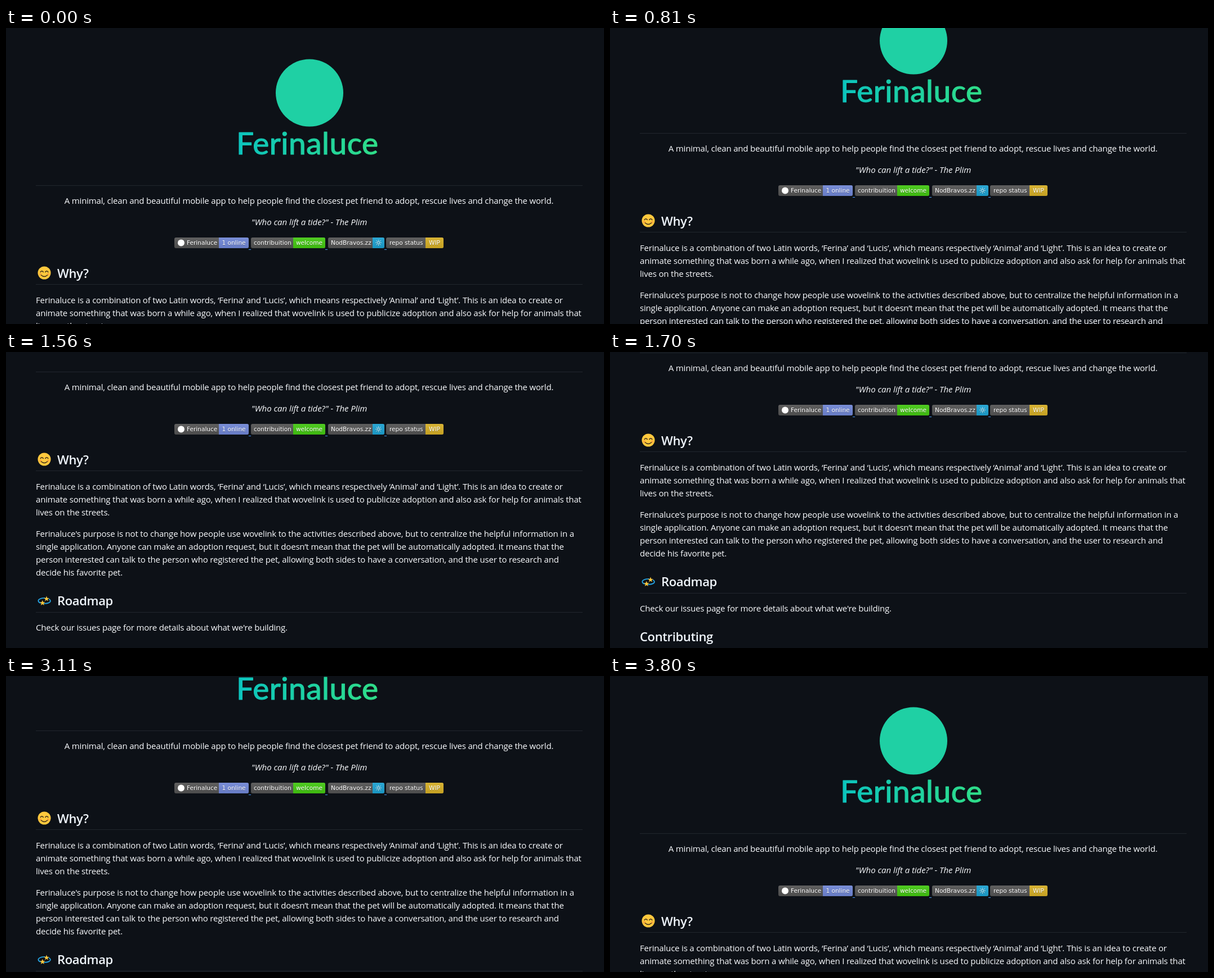
These frames come from a looping animation (1062 by 527 pixels, 4730 ms). An HTML page:

```html
<!DOCTYPE html>
<html lang="en">
<head>
<meta charset="utf-8">
<title>Readme scroll</title>
<style>
  html, body { margin: 0; width: 100%; height: 100%; overflow: hidden; background: #0d1117; }
  svg { display: block; width: 1062px; height: 527px; }
  text { font: 15px "Open Sans", "Noto Sans", sans-serif; letter-spacing: -.187px; fill: #fafcff; }
  .mid { text-anchor: middle; }
  .quote { font-style: italic; letter-spacing: -.05px; }
  .head { font-size: 22px; font-weight: 600; letter-spacing: -.36px; fill: #f0f6fc; }
  .word { font: 55px Lato, sans-serif; letter-spacing: .5px; fill: url(#brand); stroke: url(#brand); stroke-width: 1.2; stroke-linejoin: round; }
  .badge text { font: 10.56px "DejaVu Sans", sans-serif; letter-spacing: 0; fill: #fff; }
  .badge .shade { fill: #010101; fill-opacity: .3; }
  .rule { fill: #21262d; }
  .link { fill: #4493f8; }
  .line { fill: none; stroke-linecap: round; }
</style>
</head>
<body>
<svg viewBox="0 0 1062 527">
  <defs>
    <linearGradient id="brand" gradientUnits="userSpaceOnUse" x1="413" x2="660" y1="0" y2="0">
      <stop stop-color="#0cc4bd"/><stop offset="1" stop-color="#2fde88"/>
    </linearGradient>
    <linearGradient id="gloss" x2="0" y2="1">
      <stop stop-color="#bbb" stop-opacity=".1"/><stop offset="1" stop-opacity=".1"/>
    </linearGradient>
    <path id="star" d="M0-5 1.3-1.6 4.8-1.5 2 .7 3 4.1 0 2.1-3 4.1-2 .7-4.8-1.5-1.3-1.6Z"/>
  </defs>
  <g id="page">
    <circle cx="539" cy="115.5" r="60" fill="#1fd0a4"/>
    <text class="word" x="409" y="225">Ferinaluce</text>

    <text class="mid" x="538" y="313">A minimal, clean and beautiful mobile app to help people find the closest pet friend to adopt, rescue lives and change the world.</text>
    <text class="mid quote" x="538.5" y="351">"Who can lift a tide?" - The Plim</text>
    <g id="badges"></g>

    <!-- smiling face -->
    <g transform="translate(68 436)">
      <circle r="11.5" fill="#ffc83d"/>
      <circle cx="-7" cy="2.5" r="2.2" fill="#ff9a3c" opacity=".7"/>
      <circle cx="7" cy="2.5" r="2.2" fill="#ff9a3c" opacity=".7"/>
      <path class="line" stroke="#3b2d1a" stroke-width="1.5" d="M-6.8-1.5Q-4.3-5-1.8-1.5M1.8-1.5Q4.3-5 6.8-1.5M-5.5 4Q0 9 5.5 4"/>
    </g>
    <text class="head" x="91" y="445">Why?</text>
    <g id="body"></g>

    <!-- orbiting stars -->
    <g transform="translate(68 688)">
      <path class="line" stroke="#26a5e4" stroke-width="1.8" d="M1-4.8C-6-5.2-11-2.5-10.6.3C-10.3 2.2-8.6 3.2-6.8 3.8M0 4.9C7 5 11.3 2.5 10.8-.2C10.5-1.6 9.8-2.4 8.6-3"/>
      <use href="#star" x="4" y="-3.5" fill="#ffc83d"/>
      <use href="#star" x="-3.2" y="3.8" fill="#ffc83d"/>
    </g>
    <text class="head" x="91" y="696">Roadmap</text>
    <text x="53" y="741">Check our issues page for more details about what we're building.</text>
    <text class="head" x="53" y="794">Contributing</text>
  </g>
</svg>
<script>
const $ = id => document.getElementById(id);

// left, split and right edges, label start, label, value, value colour
const badges = [
  [299, 378, 431, 321, 'Ferinaluce', '1 online', '#7289da'],
  [435, 510, 567, 440, 'contribuition', 'welcome', '#44cc11'],
  [572, 651, 672, 577, 'NodBravos.zz', '<tspan font-size="15" dy="1.5">☼</tspan>', '#1ca5d6'],
  [675, 745, 777, 681, 'repo status', 'WIP', '#dab226'],
];

const label = (x, text, attrs = '') =>
  `<text class="shade" x="${x}" y="387" ${attrs}>${text}</text><text x="${x}" y="386" ${attrs}>${text}</text>`;

$('badges').innerHTML = badges.map(([left, split, right, start, name, value, colour], i) => `
  <g class="badge">
    <rect x="${left}" y="373" width="${right - left}" height="19" rx="3" fill="#555"/>
    <path d="M${split} 373H${right - 3}q3 0 3 3v13q0 3-3 3H${split}z" fill="${colour}"/>
    <rect x="${left}" y="373" width="${right - left}" height="19" rx="3" fill="url(#gloss)"/>
    ${label(start, name)}${label((split + right) / 2, value, 'text-anchor="middle"')}
  </g>
  ${i < 3 ? `<rect class="link" x="${right}" y="394" width="4" height="1"/>` : ''}`).join('') +
  '<circle cx="311" cy="382.5" r="6" fill="#fff"/>';

const lines = [
  [490, 'Ferinaluce is a combination of two Latin words, ‘Ferina’ and ‘Lucis’, which means respectively ‘Animal’ and ‘Light’. This is an idea to create or'],
  [513, 'animate something that was born a while ago, when I realized that wovelink is used to publicize adoption and also ask for help for animals that'],
  [536, 'lives on the streets.'],
  [574, "Ferinaluce's purpose is not to change how people use wovelink to the activities described above, but to centralize the helpful information in a"],
  [597, 'single application. Anyone can make an adoption request, but it doesn’t mean that the pet will be automatically adopted. It means that the'],
  [620, 'person interested can talk to the person who registered the pet, allowing both sides to have a conversation, and the user to research and'],
  [643, 'decide his favorite pet.'],
];
$('body').innerHTML =
  lines.map(([y, text]) => `<text x="53" y="${y}">${text}</text>`).join('') +
  [280, 456, 708].map(y => `<rect class="rule" x="53" y="${y}" width="971" height="1"/>`).join('');

// wheel notches: time of first visible step, distance, time already eased by then
const LOOP = 4730, STEP = 70, EASE = 212;
const notches = [
  [670, 96, 51], [950, 96, 51], [1490, 87, 51],
  [2900, -96, 51], [3240, -96, 80], [3590, -87, 51],
];

function scrollAt(t) {
  let y = 0;
  for (const [start, distance, lead] of notches) {
    if (t < start) break;
    const x = Math.min(1, (Math.floor((t - start) / STEP) * STEP + lead) / EASE);
    y += distance * x * x * (3 - 2 * x);
  }
  return Math.round(y);
}

const origin = performance.now();
function draw() {
  const t = (performance.now() - origin) % LOOP;
  $('page').setAttribute('transform', `translate(0 ${-scrollAt(t)})`);
  requestAnimationFrame(draw);
}
draw();
</script>
</body>
</html>
```
